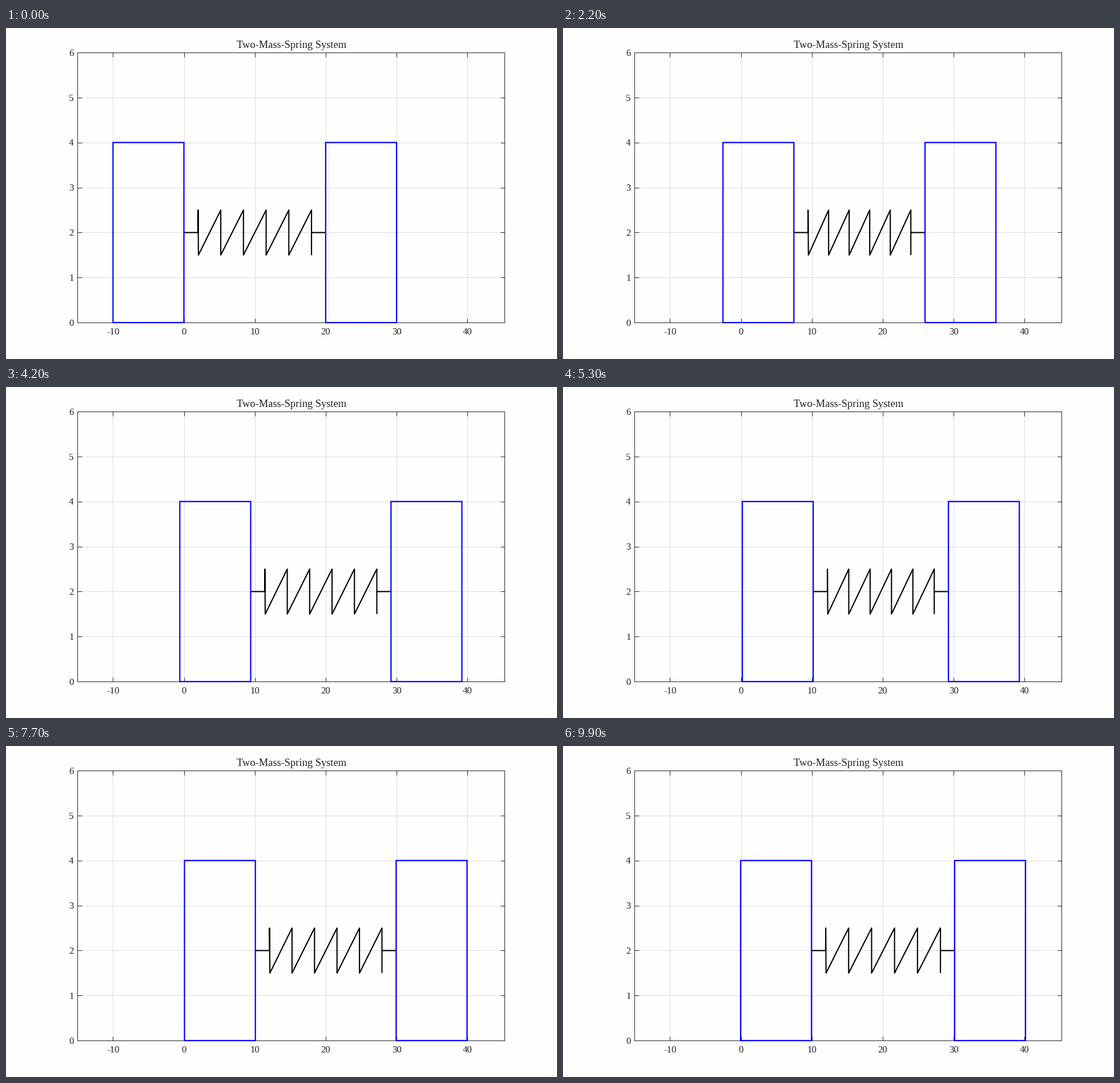
Animation, 965 px wide and 580 px high, one loop 10 s. Source, as a matplotlib script:

```python
import numpy as np
import matplotlib.pyplot as plt
from matplotlib.animation import FuncAnimation
from matplotlib.patches import Rectangle

W, H, DPI = 965, 580, 100
FRAMES, INTERVAL = 100, 100
PX = 72 / DPI                      # points per pixel
INK = "#212121"
FONT = "Liberation Serif"

# Two equal masses with ground friction; a short push acts on the left one.
PUSH, FRICTION, OMEGA, PUSH_TIME = 11.2, 0.75, 1.85, 1.348
SIGMA = FRICTION / 2


def step_response(t):
    """Mean displacement and stretch under a constant push from t = 0."""
    t = max(t, 0.0)
    mean = PUSH / (2 * FRICTION) * (t - (1 - np.exp(-FRICTION * t)) / FRICTION)
    swing = np.cos(OMEGA * t) + SIGMA / OMEGA * np.sin(OMEGA * t)
    stretch = -PUSH / (OMEGA**2 + SIGMA**2) * (1 - np.exp(-SIGMA * t) * swing)
    return np.array([mean, stretch])


def displacements(t):
    mean, stretch = step_response(t) - step_response(t - PUSH_TIME)
    return mean - stretch / 2, mean + stretch / 2


def spring_points(a, b, teeth=5, lead=2.0):
    """Sawtooth spring from wall a to wall b."""
    xs = np.linspace(a + lead, b - lead, teeth + 1)
    pts = [(a, 2), (xs[0], 2), (xs[0], 2.5), (xs[0] + 0.05, 1.5)]
    for x in xs[1:]:
        pts += [(x, 2.5), (x, 1.5)]
    pts += [(np.nan, np.nan), (xs[-1], 2), (b, 2)]
    return np.transpose(pts)


fig = plt.figure(figsize=(W / DPI, H / DPI), dpi=DPI, facecolor="#fefefe")
ax = fig.add_axes([125.35 / W, 63.8 / H, 748 / W, 473.3 / H],
                  facecolor="#fefefe")
ax.set(xlim=(-15, 45.25), ylim=(0, 6),
       xticks=range(-10, 41, 10), yticks=range(7))
ax.set_axisbelow(True)
ax.grid(color=INK, alpha=0.15, linewidth=PX)
ax.tick_params(direction="in", top=True, right=True, length=7.5 * PX,
               width=PX, color=INK, labelbottom=False, labelleft=False)
for spine in ax.spines.values():
    spine.set(color=INK, linewidth=PX)


def label(x, y, text, size, ha="center"):
    fig.text(x / W, 1 - y / H, text, family=FONT, fontsize=size * PX,
             ha=ha, va="baseline", color=INK)


def to_px(x, y):
    px, py = ax.transData.transform((x, y))
    return px, H - py


label(499.8, 35, "Two-Mass-Spring System", 18.55)
for v in range(-10, 41, 10):
    label(to_px(v, 0)[0], 536.8, str(v), 16.8)
for v in range(7):
    label(118.5, to_px(0, v)[1] + 5.8, str(v), 16.8, ha="right")


def make_mass():
    return ax.add_patch(Rectangle((0, 0), 10, 4, fill=False, edgecolor="blue",
                                  linewidth=2.2 * PX, zorder=4,
                                  clip_on=False, snap=False))


left, right = make_mass(), make_mass()
spring, = ax.plot([], [], color="black", linewidth=2.1 * PX, zorder=3,
                  solid_joinstyle="round", solid_capstyle="butt")


def update(i):
    x1, x2 = displacements(i * INTERVAL / 1000)
    left.set_x(x1 - 10)
    right.set_x(x2 + 20)
    spring.set_data(*spring_points(x1, x2 + 20))
    return left, right, spring


anim = FuncAnimation(fig, update, frames=FRAMES, interval=INTERVAL,
                     repeat=True, repeat_delay=0)
plt.show()
```
